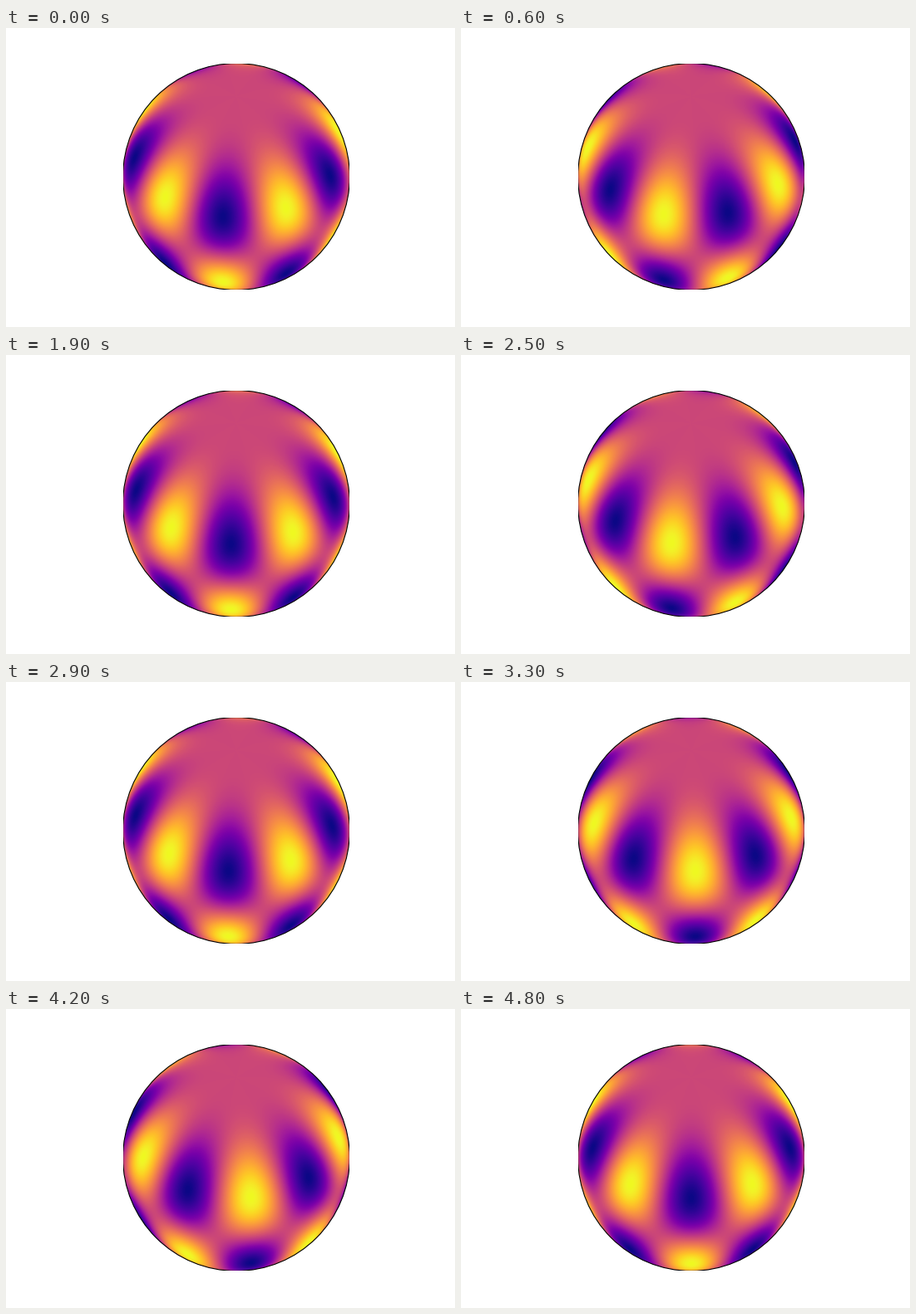
Recreate the animation shown at these times as a matplotlib script. Size 540 by 360 pixels, loop 4900 ms.

```python
import numpy as np
import matplotlib.pyplot as plt
from matplotlib.animation import FuncAnimation
from matplotlib.patches import Circle, Rectangle

W, H, DPI = 540, 360, 100
FRAMES, INTERVAL = 49, 100
LEFT, TOP, SIZE = 141, 43, 272
CX, CY = LEFT + SIZE / 2, TOP + SIZE / 2
RADIUS = 136.4
M = 5                      # zonal order; the degree is M + 1
TILT = np.radians(45)      # latitude at the centre of the view

# Orthographic view: unit-sphere coordinates of every pixel
axis = (np.arange(SIZE) + 0.5 - SIZE / 2) / RADIUS
x, y = np.meshgrid(axis, -axis)
z = np.sqrt(np.clip(1 - x**2 - y**2, 0, 1))
sin_lat = y * np.cos(TILT) + z * np.sin(TILT)
front = z * np.cos(TILT) - y * np.sin(TILT)

# Sectoral part cos(lat)^M * exp(i M lon), times sin(lat), scaled to peak at 1
peak = (M / (M + 1)) ** (M / 2) / np.sqrt(M + 1)
harmonic = sin_lat * (front + 1j * x) ** M / peak


def field(i):
    turn = 2 * np.pi * (i + 1) / FRAMES
    return -(harmonic * np.exp(1j * M * turn)).real


fig = plt.figure(figsize=(W / DPI, H / DPI), dpi=DPI, facecolor="white")
ax = fig.add_axes([0, 0, 1, 1])
ax.axis("off")

globe = ax.imshow(field(0), cmap="plasma", vmin=-1, vmax=1,
                  interpolation="nearest", aspect="auto",
                  extent=(LEFT, LEFT + SIZE, TOP + SIZE, TOP))
ax.set_xlim(0, W)
ax.set_ylim(H, 0)
globe.set_clip_path(Circle((CX, CY), RADIUS, transform=ax.transData))

outline = Circle((CX, CY), RADIUS, fill=False, ec="black", lw=0.8, zorder=3)
ax.add_patch(outline)
outline.set_clip_path(Rectangle((LEFT, TOP), SIZE, SIZE, transform=ax.transData))


def update(i):
    globe.set_data(field(i))
    return (globe,)


anim = FuncAnimation(fig, update, frames=FRAMES, interval=INTERVAL,
                     repeat=True, repeat_delay=0)
plt.show()
```
